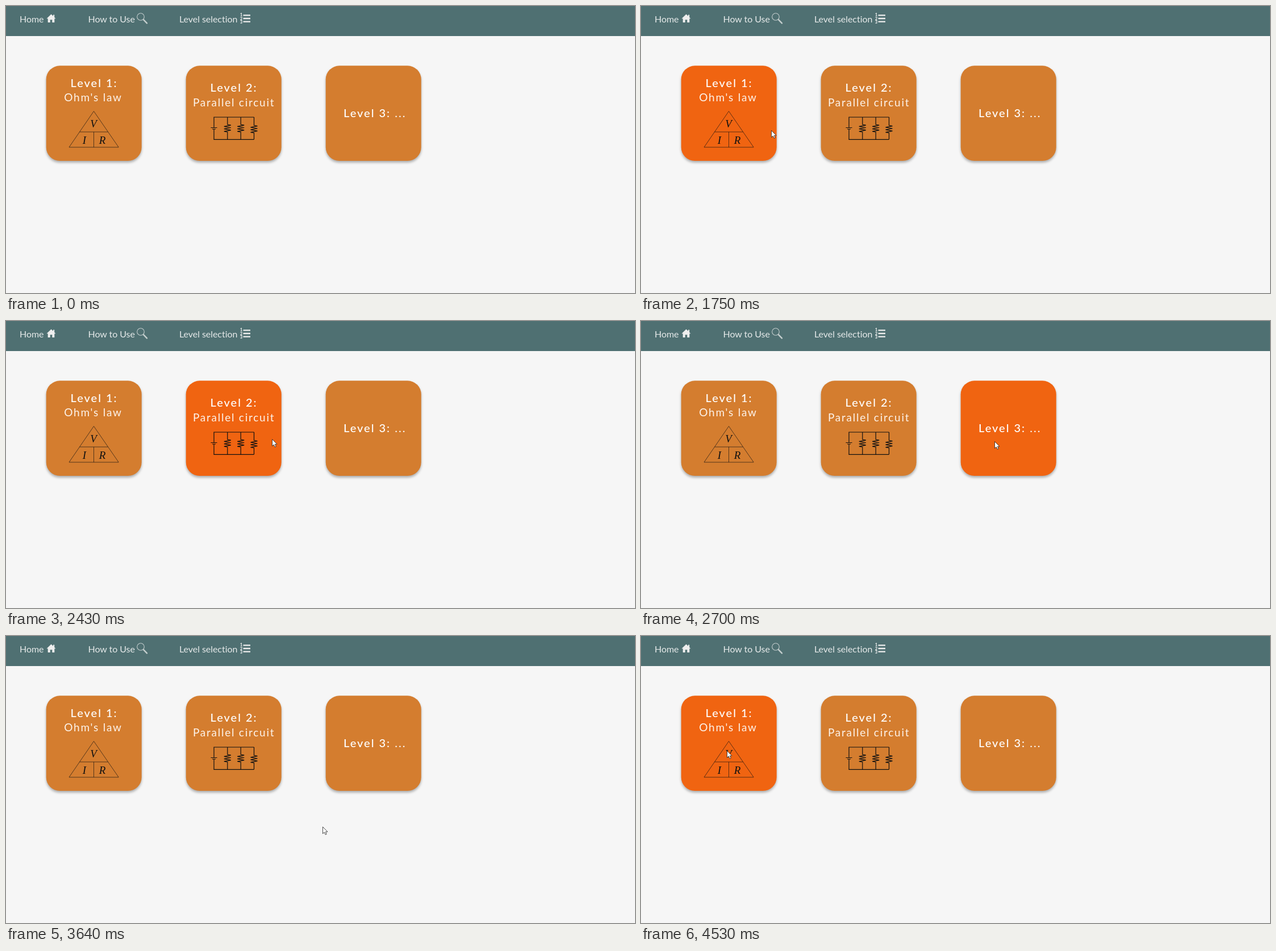
An HTML page that plays this animation: 1107 by 506 pixels, repeating every 4.59 s.

```html
<!DOCTYPE html>
<html lang="en">
<head>
<meta charset="utf-8">
<title>Level selection</title>
<style>
  html, body { margin: 0; width: 100%; height: 100%; overflow: hidden; background: #f6f6f6; }
  svg { display: block; width: 1107px; height: 506px; }
  text { font-family: Lato, "Open Sans", sans-serif; fill: #fff; white-space: pre; }
  .nav text { font-size: 16px; letter-spacing: -.05px; fill: #e6eaea; }
  .nav .digit { font-size: 7px; font-weight: 900; }
  .card rect { fill: #d47d2f; filter: drop-shadow(0 3px 2px rgba(0, 0, 0, .3)); }
  .card.hover rect { fill: #f06411; }
  .title { font-size: 20px; font-weight: 500; letter-spacing: 2px; }
  .sub, .title tspan { font-weight: 400; }
  .sub { font-size: 19px; letter-spacing: 1.75px; fill: #fdf3ea; }
  .symbol text { font: italic 19px "Liberation Serif", serif; fill: #111; text-anchor: middle; }
  .line { fill: none; stroke: #111; }
</style>
</head>
<body>
<svg viewBox="0 0 1107 506">
  <rect width="1107" height="506" fill="#f6f6f6"/>
  <g class="nav">
    <rect width="1107" height="53" fill="#4f7072"/>
    <text x="24" y="29">Home</text>
    <path fill="#eee" d="M79.5 14.5 83 17.8V15.5H85.2V19.9L87.5 22.3H85.3V29H81.3V24.2H77.7V29H73.7V22.3H71.5Z"/>
    <text x="144.5" y="29">How to Use</text>
    <g fill="none" stroke="#c3cdcd">
      <circle cx="237" cy="19" r="6.3" stroke-width="1.1"/>
      <path d="M242 24.2 248 30.4" stroke-width="2.4" stroke-linecap="round"/>
    </g>
    <text x="305" y="29">Level selection</text>
    <path d="M417.5 16.4H430M417.5 22H430M417.5 27.6H430" stroke="#eee" stroke-width="2.3"/>
    <text class="digit" x="412" y="18">1</text>
    <text class="digit" x="412" y="24.6">2</text>
    <text class="digit" x="412" y="31.2">3</text>
  </g>

  <g class="card">
    <rect x="70.7" y="105.3" width="168" height="167.7" rx="24"/>
    <text class="title" x="113.5" y="143">Level 1:</text>
    <text class="sub" x="102.3" y="168.3">Ohm's law</text>
    <path class="line" stroke-width=".65" d="M154.5 185.5 198.2 249H111ZM129.5 222H179.5M154.5 222V249"/>
    <g class="symbol">
      <text x="154" y="214">V</text>
      <text x="138" y="243">I</text>
      <text x="169.5" y="243">R</text>
    </g>
  </g>

  <g class="card">
    <rect x="316.7" y="105.3" width="168" height="167.7" rx="24"/>
    <text class="title" x="359.5" y="151.4">Level 2:</text>
    <text class="sub" x="329" y="176.6">Parallel circuit</text>
    <path id="circuit" class="line" stroke-width="1.2"/>
  </g>

  <g class="card">
    <rect x="562.7" y="105.3" width="168" height="167.7" rx="24"/>
    <text class="title" x="594" y="196.3">Level 3: <tspan>...</tspan></text>
  </g>

  <path id="cursor" d="M.5 .5V12.5L3.3 10 5.2 14.2 7.2 13.3 5.4 9.2H9Z" fill="#fff" stroke="#222" stroke-width=".8"/>
</svg>
<script>
const LOOP = 4590, STEP = 67.5;

// Where the pointer turns or rests: step, x, y.
const stops = [
  [8, 863, 453], [10, 612, 404], [15, 224, 400], [17, 163, 272], [20, 151, 206],
  [24, 151, 206], [26, 229, 219], [28, 350, 225], [31, 430, 212],
  [34, 430, 212], [36, 468, 208], [40, 622, 212], [43, 649, 212],
  [49, 649, 212], [54, 557, 336], [57, 223, 372], [59, 162, 275], [62, 139, 192],
  [66, 139, 192], [67, 151, 202]
].map(([step, x, y]) => ({ step, x, y }));

const cards = [...document.querySelectorAll('.card')];
const cursor = document.getElementById('cursor');

const zigzag = 'l6 1.1' + 'l-12 2.2l12 2.2'.repeat(2) + 'l-12 2.2l6 1.1';
const resistor = (x, y) => `M${x} 196V${y}${zigzag}V235`;
document.getElementById('circuit').setAttribute('d',
  'M366 214.5V196H436.5M366 217V235.3H436.5M360.5 214.5H371.5M363 217H369' +
  resistor(389.8, 209) + resistor(413.2, 209) + resistor(436.5, 210.5));

const mix = (a, b, k) => a + (b - a) * k;

function cursorAt(step) {
  const next = Math.max(1, stops.findIndex(stop => stop.step >= step));
  const a = stops[next - 1], b = stops[next];
  const k = (step - a.step) / (b.step - a.step);
  return { x: mix(a.x, b.x, k), y: mix(a.y, b.y, k) };
}

function draw(now) {
  // The pointer is sampled at a fixed rate, so it moves in hard steps.
  const step = Math.min(67, Math.floor((now % LOOP) / STEP + 0.3));
  const visible = step >= stops[0].step;
  const { x, y } = cursorAt(step);
  cursor.setAttribute('transform', `translate(${x} ${y})`);
  cursor.style.display = visible ? '' : 'none';
  cards.forEach((card, i) => {
    const left = 70.7 + 246 * i;
    const inside = x >= left && x <= left + 168 && y >= 105 && y < 271;
    card.classList.toggle('hover', visible && inside);
  });
  requestAnimationFrame(draw);
}
draw(performance.now());
</script>
</body>
</html>
```
